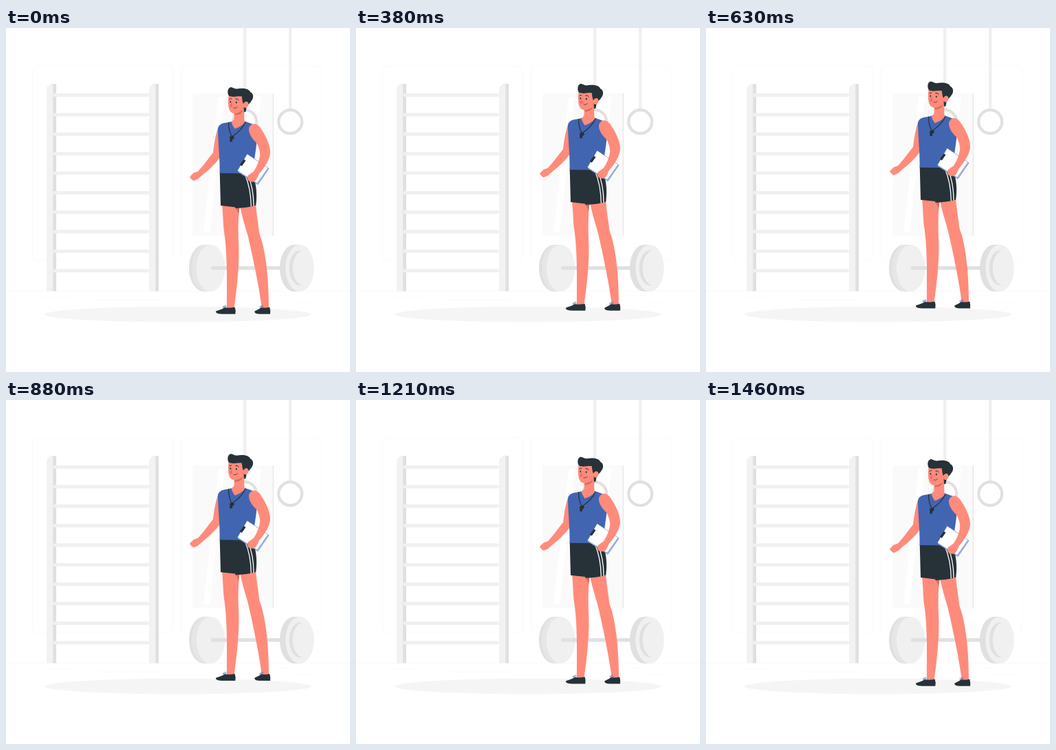
An HTML page that plays this animation: 500 px wide and 500 px high, repeating every 1500 ms.

```html
<!DOCTYPE html>
<html lang="en">
<head>
<meta charset="utf-8">
<title>Gym coach</title>
<style>
  html, body { margin: 0; width: 100%; height: 100%; overflow: hidden; background: #fff; }
  svg { display: block; width: 100vw; height: 100vh; }
  .skin { fill: #ff8b7b; }
  .ink { fill: #263238; }
  .line { fill: none; stroke: #263238; stroke-linecap: round; }
  .blue { fill: none; stroke: #4265b1; stroke-width: .7; }
</style>
</head>
<body>
<svg viewBox="0 0 500 500">
  <!-- wall and floor -->
  <g fill="none" stroke="#ebebeb" stroke-width=".3">
    <rect x="38.4" y="55.1" width="204.2" height="282.6" rx="5.6"/>
    <rect x="254.6" y="55.1" width="204.2" height="282.6" rx="5.6"/>
    <path d="M0 382.5H500M416.8 398.6h33M396.6 389.3h19.2M52.5 391h43.2M104.6 391h6.3M131.5 395.2h93.7"/>
  </g>
  <ellipse cx="250" cy="416.2" rx="193.9" ry="11.3" fill="#f5f5f5"/>

  <!-- mirror -->
  <path d="M387 95h2v207h-2z" fill="#e6e6e6"/>
  <path d="M271.5 95H387.7V302H271.5z" fill="#fafafa"/>
  <path d="M309 100h9L296 297h-9zM338 100h33L349 297H316z" fill="#fff"/>

  <!-- wall bars -->
  <g id="bars"></g>

  <!-- rings -->
  <path d="M347.2 0V118M413.2 0V118" stroke="#f0f0f0" stroke-width="4.4"/>
  <g fill="none" stroke="#e0e0e0" stroke-width="4.2">
    <circle cx="347.2" cy="136.2" r="17"/>
    <circle cx="413.2" cy="136.2" r="17"/>
  </g>

  <!-- barbell -->
  <path d="M288 315H296V383H288C276 383 266 368 266 349S276 315 288 315z" fill="#e0e0e0"/>
  <path d="M291 315H297V383H291C279 383 270 368 270 349S279 315 291 315z" fill="#e6e6e6"/>
  <ellipse cx="297.5" cy="349" rx="20.8" ry="34" fill="#f0f0f0"/>
  <path d="M300.5 348.9H404" stroke="#e0e0e0" stroke-width="5.4" stroke-linecap="round"/>
  <path d="M419 315H427V383H419C407 383 398 368 398 349S407 315 419 315z" fill="#e0e0e0"/>
  <ellipse cx="427" cy="349" rx="20.7" ry="34" fill="#f0f0f0"/>
  <ellipse cx="427.5" cy="348.8" rx="15.8" ry="25.5" fill="#e0e0e0"/>
  <ellipse cx="432" cy="348.8" rx="15.3" ry="25.2" fill="#f0f0f0"/>

  <g id="coach">
    <!-- far arm -->
    <path class="skin" d="M309 143C305 152 302.500 168 301 181C294 190 286 201 279 208.500L272.500 210.800L267 216.500Q268 219.500 272.500 222.300L279 219.500L284.500 214.500C294 207 304 198 309.500 190L318 168z"/>

    <!-- legs -->
    <path class="skin" d="M340 257C342 272 348 289 351.300 301C357 325 367 370 372 408H382C382 385 381 345 372 310C370 303 368 301 367.500 292C366 280 364 270 363 254z"/>
    <path class="skin" d="M314 256C316 278 315.500 288 317.500 300C322 330 321 375 321 408H331.500C334 390 339.500 350 338.300 318C337.500 300 337 280 339.500 259z"/>
    <path d="M333 259H340L337.600 272Q337 265 333 261z" fill="#d96a5b"/>

    <!-- shoes -->
    <path class="ink" d="M304.800 412.500C305 410.500 312 410.500 317.500 406.300Q325 407.500 332.600 405.800Q334.400 410.500 333.300 415.800H314.500Q306 415.800 304.800 412.500z"/>
    <path class="ink" d="M361.200 412.500C361.500 410.500 366 410.500 370.500 406.300Q377 407.500 383.200 405.800Q384.800 410.500 384 415.800H369Q362 415.800 361.200 412.500z"/>
    <path class="blue" d="M318 407Q314 406 315.500 404.800T318.500 406.800Q317 402.500 319 403.200T318.700 407M371.500 407Q367.500 406 369 404.800T372 406.800Q370.500 402.500 372.500 403.200T372.200 407"/>

    <!-- shorts -->
    <path class="ink" d="M310.700 209.500L312 258L333.300 260.400V262Q350 261.600 363.200 257.800C365.200 244 364 232 361.500 222L357.500 209z"/>
    <path d="M347.300 213C353 226 356 241 356.300 259.500M351.500 213C357 226 360 241 360 258.800" fill="none" stroke="#fff" stroke-width="1.300"/>

    <!-- neck and shirt -->
    <path d="M308 150C307.500 142 311 138.500 321 137.500L330 135.500L347 135.500L358 139.500L358 156L364.300 166C363.500 178 360 195 358.500 211.500L310.600 211C311 190 308.500 170 308 150z" fill="#4265b1"/>
    <path class="skin" d="M331.500 120L331.700 131Q331.500 134 327.500 136.300Q329 142 332.500 146.500Q343 143 347.500 136.500Q346 134.500 346.200 130V112z"/>
    <path d="M332.500 124Q339 124 344.500 119Q342 127 332.500 126.500z" fill="#d96a5b"/>
    <path class="line" stroke-width="1.200" d="M323.500 137.500C323.500 146 325.500 153 328.300 158C336 153 344 146 347.800 137"/>
    <path class="ink" d="M325.300 157.500L330.500 156.800Q332.800 159 330.800 161.300L329 162V165.300H325.300z"/>

    <!-- head -->
    <path class="skin" d="M324 95C322.500 104 322.500 113 324.500 118.500C326.500 123.500 331 125.200 336 123.500C341 122 345 119 346 115L350 100L344 92z"/>
    <path class="ink" d="M324.300 98.800C321.500 96 321.300 88 326 86.200C329 85.300 331 88.500 335 88.500C344 87 353 87.800 355.200 93.300C360 95 360.200 102 357 105.500C355 109 352 111.500 350 113L348.500 121.500L346 122.500L345.300 111C343.300 107 343.300 103 342.800 99.500C336 98.500 331 101.500 324.300 98.800z"/>
    <ellipse class="skin" cx="348.600" cy="111.500" rx="3.800" ry="4.700" transform="rotate(20 348.600 111.500)"/>
    <path d="M328.300 107.500Q326 111.500 325.400 114Q327 115.300 328.700 114.700z" fill="#f0695a"/>
    <ellipse class="ink" cx="326.300" cy="107.300" rx=".85" ry="1.400"/>
    <ellipse class="ink" cx="334.800" cy="108.200" rx=".95" ry="1.400"/>
    <path class="line" stroke-width="1" d="M324.800 103.500Q326 102 327.800 102.800M333.800 103Q336.500 102.300 338.300 104.800"/>
    <path class="line" stroke-width=".7" d="M331 116.300Q334.500 117.300 336.500 114.800"/>

    <!-- clipboard and near arm -->
    <path d="M351 183.800L382 204.500L366.200 227.600L337 209.300z" fill="#a9b8dc" stroke="#4265b1" stroke-width=".5" stroke-linejoin="round"/>
    <path d="M350.500 183.200L380.800 203.300L365 225.600L336.500 207.500z" fill="#fff" stroke="#7f95c9" stroke-width=".6" stroke-linejoin="round"/>
    <path class="ink" d="M345.600 190.800L348.500 192.700L342.700 200.800L339.800 198.800z"/>
    <path class="skin" d="M353 146C356 137.500 363 137.500 368.500 143.500C377 155 383.700 169 384 180C384 190 376 203 368 211.800C366.500 215 365 219 362.500 222Q358.500 225 353 222.500Q349.500 219.500 351.500 214.500L360 208.500C365 201 368.500 192 369.300 184Q369 176 364.300 167C358.500 162 352.500 154 353 146z"/>
  </g>
</svg>
<script>
  const LOOP = 1500, STEPS = 36, RISE = 10;
  const coach = document.getElementById('coach');

  const post = x =>
    `<path d="M${x + 6} 81.300h8V382.500h-5z" fill="#e0e0e0"/>` +
    `<path d="M${x} 382.500V90Q${x} 82 ${x + 9.200} 81.300V382.500z" fill="#f2f2f2"/>`;
  let bars = post(59) + post(208);
  for (let i = 0; i < 10; i++)
    bars += `<rect x="68.500" y="${95.100 + i * 28.360}" width="139.500" height="5" rx="2" fill="#f0f0f0"/>`;
  document.getElementById('bars').innerHTML = bars;

  // Linear rise and fall in 24 steps per second
  function draw(now) {
    const step = Math.floor((now % LOOP) / LOOP * STEPS + 0.1) % STEPS;
    const p = (step + 0.5) / STEPS;
    const lift = RISE * (1 - Math.abs(1 - 2 * p)) - RISE / STEPS;
    coach.setAttribute('transform', `translate(0 ${-lift.toFixed(3)})`);
  }
  function tick(now) {
    draw(now);
    requestAnimationFrame(tick);
  }
  draw(0);
  requestAnimationFrame(tick);
</script>
</body>
</html>
```
